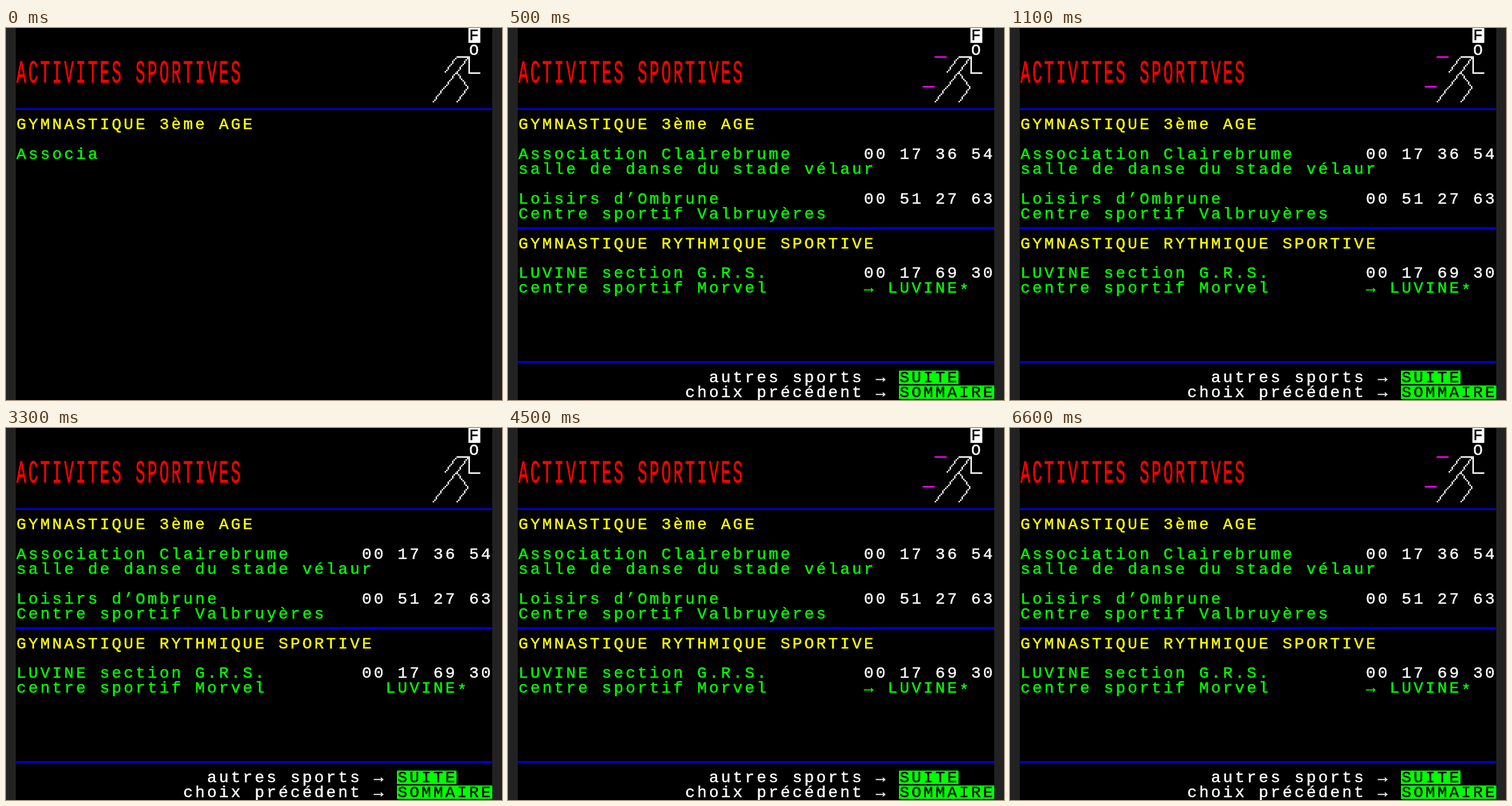
These frames come from a looping animation (864 by 648 pixels, 8000 ms). An HTML page with a canvas:

```html
<!DOCTYPE html>
<html lang="fr">
<head>
<meta charset="utf-8">
<style>
  html, body { margin: 0; width: 100%; height: 100%; overflow: hidden; background: #000; }
  canvas { display: block; }
</style>
</head>
<body>
<canvas id="screen" width="864" height="648"></canvas>
<script>
const ctx = document.getElementById('screen').getContext('2d');
// 40 x 25 character cells, each 8 x 10 dots
const LEFT = 17, CW = 20.75, CH = 25.92, DOT = 2.59;
const LOOP = 8000;
const WHITE = '#fff', GREEN = '#0f0', YELLOW = '#ff0', RED = '#f00', BLUE = '#00f', PINK = '#f0f';
const cellX = col => LEFT + col * CW;

function box(x, y, w, h, color) {
  ctx.fillStyle = color;
  ctx.fillRect(x, y, w, h);
}

function write(col, row, text, color, tall = 1) {
  ctx.fillStyle = ctx.strokeStyle = color;
  ctx.save();
  ctx.translate(0, row * CH);
  ctx.scale(1, tall);
  [...text].forEach((ch, i) => {
    const x = cellX(col + i) + 9.6;
    ctx.fillText(ch, x, 8 * DOT);
    ctx.strokeText(ch, x, 8 * DOT);
  });
  ctx.restore();
}

function label(col, row, text) {
  box(cellX(col), row * CH + 0.6, text.length * CW, 23.5, GREEN);
  write(col, row, text, '#000');
}

const rule = row => box(LEFT, row * CH + 4 * DOT, 830, DOT, BLUE);
const dash = (col, row, color) => box(cellX(col), (row + 1) * CH - DOT, CW, DOT, color);

// Stepped diagonal across one cell; dir is 1 for "\" and -1 for "/"
function slash(col, row, dir) {
  for (let i = 0; i < 10; i++) {
    const step = Math.round((dir > 0 ? i : 9 - i) * 7 / 9);
    box(cellX(col) + step * DOT, row * CH + i * DOT, DOT, DOT, WHITE);
  }
}

function runner() {
  box(cellX(38), 0, CW, CH, WHITE);
  write(38, 0, 'F', '#000');
  write(38, 1, 'O', WHITE);
  dash(37, 1, WHITE);
  [[37, 2], [36, 2], [36, 3], [35, 4], [37, 4]].forEach(([c, r]) => slash(c, r, -1));
  slash(37, 3, 1);
  box(cellX(38), 2 * CH - DOT, DOT, CH + DOT, WHITE);
  box(cellX(38), 3 * CH - 0.5, CW, DOT, WHITE);
}

function listing() {
  write(0, 8, 'Association Clairebrume', GREEN);
  write(29, 8, '00 17 36 54', WHITE);
  write(0, 9, 'salle de danse du stade vélaur', GREEN);
  write(0, 11, 'Loisirs d’Ombrune', GREEN);
  write(29, 11, '00 51 27 63', WHITE);
  write(0, 12, 'Centre sportif Valbruyères', GREEN);
  rule(13);
  write(0, 14, 'GYMNASTIQUE RYTHMIQUE SPORTIVE', YELLOW);
  write(0, 16, 'LUVINE section G.R.S.', GREEN);
  write(29, 16, '00 17 69 30', WHITE);
  write(0, 17, 'centre sportif Morvel', GREEN);
  write(31, 17, 'LUVINE', GREEN);
  write(37, 17.15, '*', GREEN);
  rule(22);
  write(16, 23, 'autres sports →', WHITE);
  label(32, 23, 'SUITE');
  write(14, 24, 'choix précédent →', WHITE);
  label(32, 24, 'SOMMAIRE');
}

function blinkers() {
  dash(35, 1, PINK);
  dash(34, 3, PINK);
  write(29, 17, '→', GREEN);
}

function draw(now) {
  const t = now % LOOP;
  box(0, 0, 864, 648, '#222');
  box(LEFT, 0, 830, 648, '#000');
  ctx.font = '28px "Liberation Mono", monospace';
  ctx.textAlign = 'center';
  ctx.lineWidth = 0.5;

  write(0, 2.08, 'ACTIVITES SPORTIVES', RED, 2);
  runner();
  rule(5);
  write(0, 6, 'GYMNASTIQUE 3ème AGE', YELLOW);
  if (t < 500) write(0, 8, 'Associa', GREEN);
  else listing();
  if ((t >= 500 && t < 1500) || t >= 4500) blinkers();
}

const start = performance.now();
function tick() {
  draw(performance.now() - start);
  requestAnimationFrame(tick);
}
tick();
</script>
</body>
</html>
```
